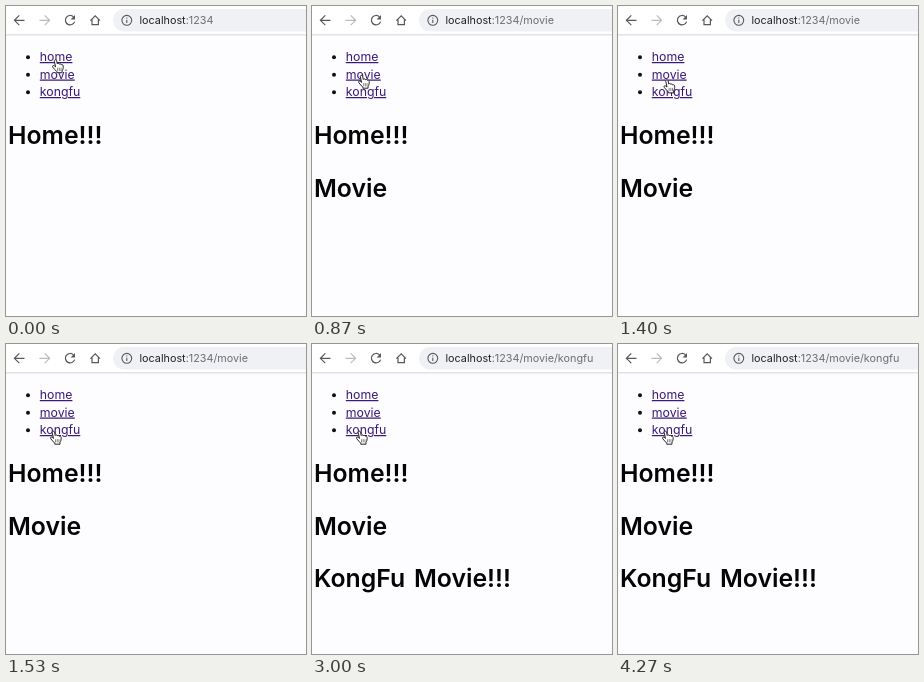
Write an HTML page that moves like this. It is 300x310 px and loops after 4.54 s.

```html
<!DOCTYPE html>
<html lang="en">
<head>
<meta charset="utf-8">
<title>Nested routes</title>
<style>
  html, body { margin: 0; width: 100%; height: 100%; overflow: hidden; background: #fdfcfe; }
  svg { display: block; width: 300px; height: 310px; }
  text { font-family: Inter, "Liberation Sans", sans-serif; }
  .url { font-size: 10.8px; fill: #6b6e73; }
  .host { fill: #202124; }
  .link { font-size: 12.3px; fill: #3a1a78; text-decoration: underline; text-decoration-thickness: 1px; }
  .title { font-size: 24.8px; font-weight: 600; word-spacing: 2.5px; fill: #050505; }
  .icon { fill: none; stroke: #55585c; stroke-width: 1.2; }
</style>
</head>
<body>
<svg viewBox="0 0 300 310">
  <rect width="300" height="310" fill="#fdfcfe"/>
  <rect width="300" height="28" fill="#fff"/>
  <rect y="28.3" width="300" height="1.1" fill="#d8d9dc"/>
  <rect x="107" y="3" width="220" height="22.5" rx="11.2" fill="#f0f1f4"/>

  <g class="icon">
    <path d="M18.5 14.3H8.6M13.3 9.4L8.4 14.3L13.3 19.2"/>
    <path d="M33.5 14.3H43.4M38.7 9.4L43.6 14.3L38.7 19.2" stroke="#b9bbbe"/>
    <path d="M67.5 10.9A4.7 4.7 0 1 0 68.6 15.6"/>
    <path d="M69 9V13.4H64.6Z" fill="#55585c" stroke="none"/>
    <path d="M84.4 14.6L89.2 9.8L94 14.6M86 13.4V18.7H92.4V13.4"/>
    <circle cx="120.8" cy="14.3" r="4.9" stroke-width="1.1"/>
    <path d="M120.8 13.7V17M120.8 11.4V12.6" stroke-width="1.1"/>
  </g>

  <text class="url" x="133.5" y="18"><tspan class="host">localhost</tspan>:1234<tspan id="path"></tspan></text>

  <g fill="#111">
    <circle cx="22" cy="51.2" r="2"/>
    <circle cx="22" cy="68.7" r="2"/>
    <circle cx="22" cy="86.2" r="2"/>
  </g>
  <text class="link" x="33.8" y="55">home</text>
  <text class="link" x="33.8" y="72.5">movie</text>
  <text class="link" x="33.8" y="90">kongfu</text>

  <text class="title" x="2" y="137.7">Home!!!</text>
  <text class="title" id="movie" x="2" y="190.5">Movie</text>
  <text class="title" id="kongfu" x="2" y="242.7">KongFu Movie!!!</text>

  <!-- hand pointer, fingertip near the local origin -->
  <g id="hand" stroke-linejoin="round" stroke-linecap="round">
    <path d="M-1.4 0.8C-1.4 -0.7 0.9 -0.8 1.1 0.6L1.8 4.2C2.2 3.2 3.8 3.3 4 4.5C4.6 3.8 5.9 4 6.1 5.1C6.9 4.6 8 5 8.1 6.2C8.3 8.6 7.8 10.2 6.9 11.6V13.5H1.3V12.4C-0.3 11 -1.5 9.2 -2.9 7.7C-3.9 6.5 -2.6 5.4 -1.4 6.2L-0.3 7.1Z"
          fill="#fff" stroke="#222" stroke-width="1.05"/>
    <path d="M2.2 8.6V11.2M4 8.6V11.2M5.8 8.6V11.2" fill="none" stroke="#444" stroke-width="0.7"/>
  </g>
</svg>
<script>
  const LOOP = 4540, FPS = 15;
  const MOVIE_AT = 870, KONGFU_AT = 2000;
  const stops = [[49.6, 54], [49.6, 69.5], [47.5, 87.5]];
  const byId = id => document.getElementById(id);
  const path = byId("path"), movie = byId("movie"), kongfu = byId("kongfu"), hand = byId("hand");

  const ease = p => p * p * (3 - 2 * p);
  const progress = (tick, from, to) => ease(Math.min(1, Math.max(0, (tick - from) / (to - from))));
  const show = (el, on) => el.setAttribute("visibility", on ? "visible" : "hidden");

  function draw(t) {
    const tick = Math.floor(t * FPS / 1000 + 0.06);
    const a = progress(tick, 0, 6), b = progress(tick, 20, 23);
    const [x, y] = [0, 1].map(i =>
      stops[0][i] + (stops[1][i] - stops[0][i]) * a + (stops[2][i] - stops[1][i]) * b);
    hand.setAttribute("transform", `translate(${x} ${y}) scale(0.94)`);

    show(movie, t >= MOVIE_AT);
    show(kongfu, t >= KONGFU_AT);
    path.textContent = t >= KONGFU_AT ? "/movie/kongfu" : t >= MOVIE_AT ? "/movie" : "";
  }

  const start = performance.now();
  function loop() {
    draw((performance.now() - start) % LOOP);
    requestAnimationFrame(loop);
  }
  loop();
</script>
</body>
</html>
```
